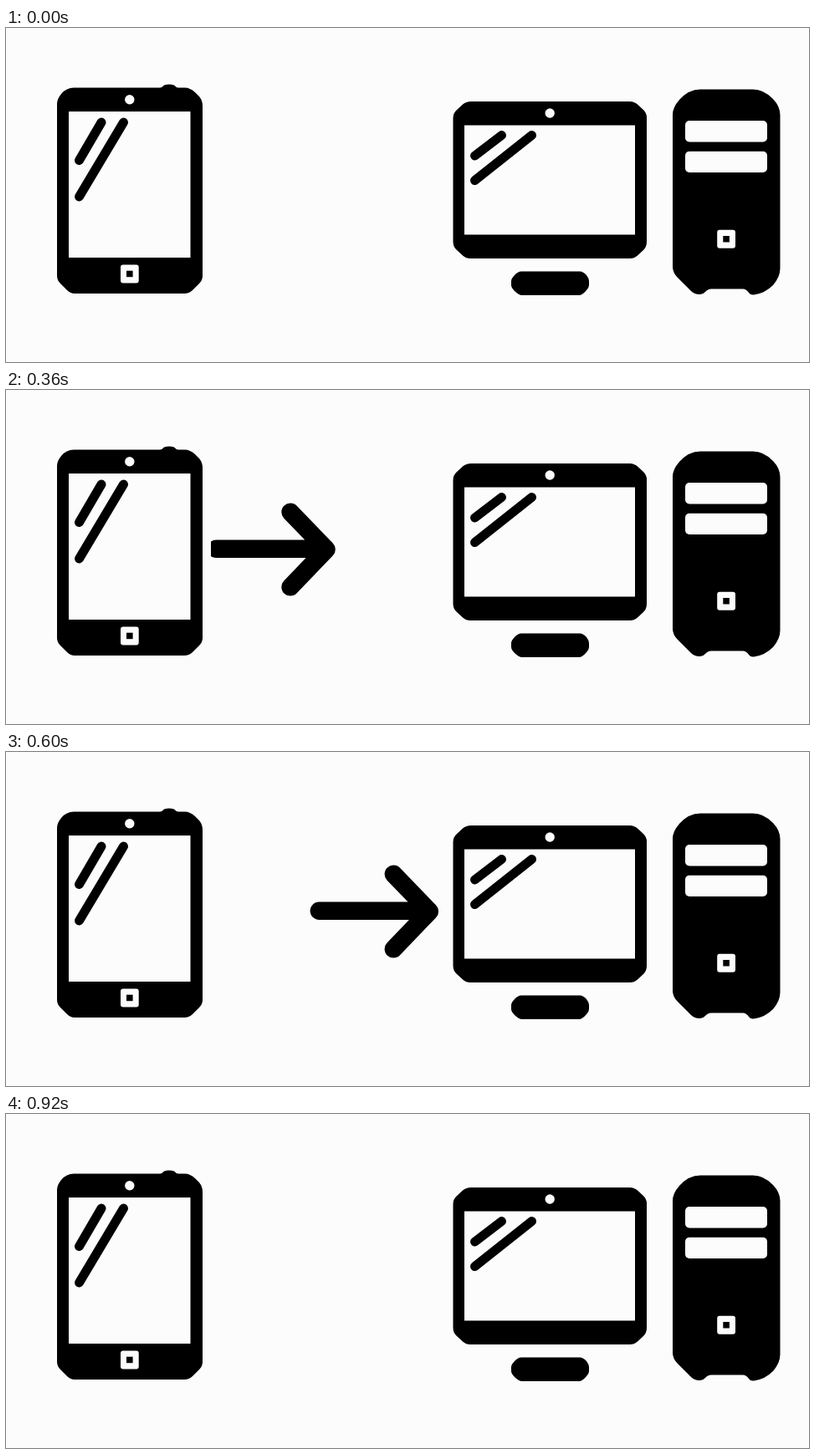
Write an HTML page that moves like this. It is 960 px wide and 400 px high and loops after 0.96 s.

```html
<!DOCTYPE html>
<html lang="en">
<head>
<meta charset="utf-8">
<title>Phone to computer</title>
<style>
  html, body { margin: 0; width: 100%; height: 100%; overflow: hidden; background: #fcfcfc; }
  svg { display: block; width: 960px; height: 400px; }
  .light { fill: #fcfcfc; }
  .line { fill: none; stroke: #000; stroke-linecap: round; stroke-linejoin: round; }
</style>
</head>
<body>
<svg viewBox="0 0 960 400">
  <defs>
    <clipPath id="gap"><rect x="245" y="120" width="276" height="140"/></clipPath>
  </defs>
  <rect class="light" width="960" height="400"/>

  <g id="phone">
    <path d="M61 91Q61 85 66 79Q72 71.5 81 71.5H184Q187 71 189 68.5Q195 66.500 201 68.500Q203 71 206 71.500H214Q220 71.500 226 77L231 82Q235 87 235 93V297Q235 302 231 306L223 314Q219 318 213 318H82Q77 318 73 314L65 306Q61 302 61 297Z"/>
    <rect class="light" x="75" y="100" width="145.500" height="175"/>
    <circle class="light" cx="147.800" cy="85.700" r="5.700"/>
    <path class="line" stroke-width="11" d="M114 113L87.500 158.500M140.500 113L87.500 202"/>
    <rect class="light" x="137" y="283.500" width="21.700" height="22" rx="3"/>
    <rect x="144" y="290.700" width="7.600" height="7.500"/>
  </g>

  <g id="monitor">
    <path d="M534.500 108Q534.500 102 539 98L546 91.500Q550 88 556 88H746Q751 88 755 91.500L762 98Q766 102 766 107V256Q766 262 762 266L755 272.500Q751 276 746 276H555Q550 276 546 272.500L539 266Q534.500 262 534.500 256Z"/>
    <rect class="light" x="548" y="116.500" width="204" height="131"/>
    <circle class="light" cx="650.200" cy="102" r="5.700"/>
    <path class="line" stroke-width="11" d="M592.500 128.500L560.500 153M628.500 128.500L560.500 182.500"/>
    <path d="M616 291.500H686Q690 291.500 694 296Q697 300 697 303V308Q697 311 694 314Q689 320 685 320H617Q613 320 608 315Q604 311 604 308V303Q604 300 608 296Q612 291.500 616 291.500Z"/>
  </g>

  <g id="tower">
    <path d="M797 104Q797 95 805 86Q816 73.500 830 73.500H893Q906 73.500 917 85Q925.500 94 925.500 104V288Q925.500 298 917 308Q907 318 894 319.500Q890 320 888 317Q885 312.500 881 312.500H843Q839 312.500 836 316Q833 319.500 829 319Q823 319 819 315L803 299Q797 293 797 286Z"/>
    <rect class="light" x="812" y="111" width="98" height="25.500" rx="5"/>
    <rect class="light" x="812" y="147.700" width="98" height="25.300" rx="5"/>
    <rect class="light" x="850.200" y="241.700" width="21.800" height="22" rx="3"/>
    <rect x="857.300" y="249" width="7.600" height="7.500"/>
  </g>

  <g clip-path="url(#gap)">
    <path id="arrow" class="line" stroke-width="21.400" d="M-142.700 190.300H-12M-53.700 146.200L-10.600 190.900L-53.700 235.900"/>
  </g>
</svg>
<script>
  const LOOP = 960, STEP = 40;
  const arrow = document.getElementById('arrow');

  // The arrow tip advances in even steps through the gap.
  function draw(ms) {
    const step = Math.floor((ms % LOOP) / STEP);
    const tip = 517 + (step - 15) * 20.55;
    arrow.setAttribute('transform', `translate(${tip.toFixed(2)} 0)`);
  }

  const start = performance.now();
  function tick() {
    draw(performance.now() - start);
    requestAnimationFrame(tick);
  }
  tick();
</script>
</body>
</html>
```
